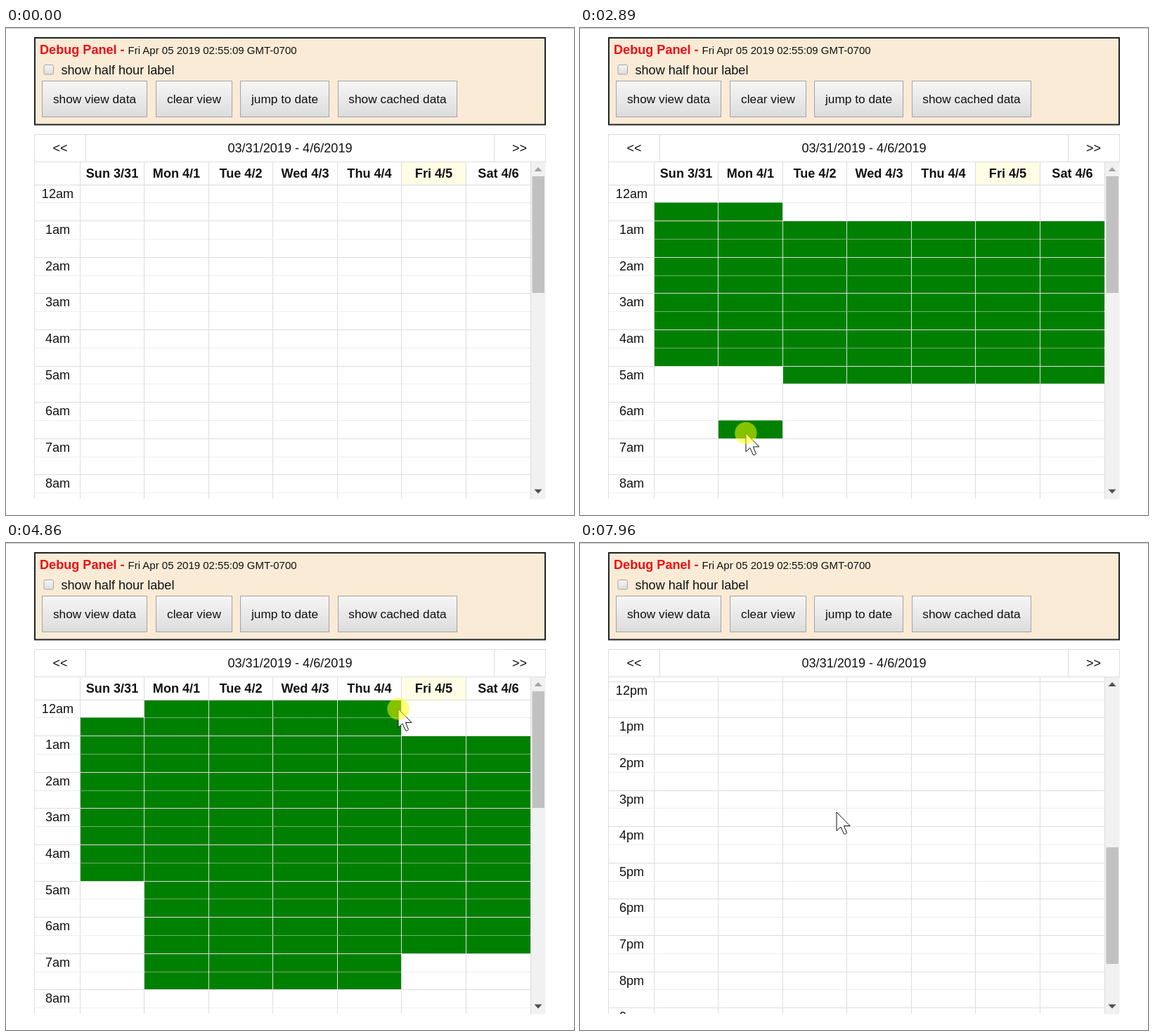
An HTML page for the animation above (8000 ms loop, 808 by 693 pixels).

```html
<!DOCTYPE html>
<html>
<head>
<meta charset="utf-8">
<title>Schedule</title>
<style>
html, body { margin: 0; width: 100%; height: 100%; overflow: hidden; background: #fff; }
svg { display: block; font-family: "Liberation Sans", Arial, sans-serif; font-size: 18.1px; fill: #111; }
</style>
</head>
<body>
<svg id="stage" width="808" height="693" viewBox="0 0 808 693">
  <defs>
    <linearGradient id="face" x2="0" y2="1">
      <stop stop-color="#f6f6f6"/><stop offset="1" stop-color="#dcdcdc"/>
    </linearGradient>
    <clipPath id="view"><rect x="40" y="190" width="707" height="480"/></clipPath>
  </defs>
</svg>
<script>
const LOOP = 8000, TICK = 77, LAG = 75, HOLD = 90;
const DAYS = 7, SLOTS = 16, ROW = 25.8, TOP = 223, SCROLL = 645;
const GREY = '#ddd';
const colX = c => Math.round(104.7 + 91.55 * c);
const rowY = r => Math.floor(TOP + ROW * r + .001);
const clamp = (v, a, b) => Math.min(b, Math.max(a, v));
const stage = document.getElementById('stage');

function add(parent, tag, attrs, text) {
  const el = document.createElementNS('http://www.w3.org/2000/svg', tag);
  for (const k in attrs) el.setAttribute(k, attrs[k]);
  if (text) el.textContent = text;
  parent.appendChild(el);
  return el;
}
const box = (p, x, y, width, height, fill, more) =>
  add(p, 'rect', { x, y, width, height, fill, ...more });
const label = (p, x, y, text, more) => add(p, 'text', { x, y, ...more }, text);
const mid = { 'text-anchor': 'middle' };
const bold = { 'font-weight': 'bold' };

// Debug panel
box(stage, 0, 0, 808, 1, '#c8c8c8');
box(stage, 41, 14, 726, 123.5, '#faebd7', { stroke: '#222', 'stroke-width': 2 });
label(stage, 48, 37, 'Debug Panel -', { ...bold, fill: '#f00e12' });
label(stage, 173.5, 37, 'Fri Apr 05 2019 02:55:09 GMT-0700', { 'font-size': 15 });
box(stage, 54, 52.5, 13.5, 13.5, 'url(#face)', { rx: 2, stroke: '#a5a5a5' });
label(stage, 78.5, 66, 'show half hour label');
[[51, 149, 'show view data'], [213, 108, 'clear view'],
 [333, 126, 'jump to date'], [472, 169, 'show cached data']].forEach(([x, w, text]) => {
  box(stage, x + .5, 75.5, w, 51, 'url(#face)', { stroke: '#a3a3a3' });
  label(stage, x + .5 + w / 2, 107, text, { ...mid, 'font-size': 17.3 });
});

// Scrolling calendar
const page = add(add(stage, 'g', { 'clip-path': 'url(#view)' }), 'g', {});
box(page, colX(5), 190, 92, 33, '#fffde5');
['Sun 3/31', 'Mon 4/1', 'Tue 4/2', 'Wed 4/3', 'Thu 4/4', 'Fri 4/5', 'Sat 4/6'].forEach((day, c) =>
  label(page, (colX(c) + colX(c + 1)) / 2 + .5, 212.5, day, { ...mid, ...bold }));

const cells = [];
for (let c = 0; c < DAYS; c++) {
  for (let r = 0; r < SLOTS; r++) {
    const x = colX(c), y = rowY(r);
    cells.push(box(page, x, y, colX(c + 1) - x, rowY(r + 1) - y, '#008000'));
  }
}
for (let r = 0; r <= 48; r++) {
  const y = rowY(r), h = r / 2;
  if (r % 2) {
    add(page, 'path', { d: `M41 ${y + .5}H746`, stroke: GREY, 'stroke-dasharray': '1 1' });
  } else {
    box(page, 41, y, 705, 1, GREY);
    if (r < 48) label(page, 73.5, y + 19, (h % 12 || 12) + (h < 12 ? 'am' : 'pm'), mid);
  }
}
for (let c = 0; c <= DAYS; c++) box(page, colX(c), 190, 1, 1275, GREY);
box(stage, 40, 151, 1, 519, GREY);

// Navigation bar
box(stage, 40.5, 151.5, 727, 39, '#fff', { stroke: GREY });
box(stage, 113, 151, 1, 39, GREY);
box(stage, 694, 151, 1, 39, GREY);
label(stage, 77, 177, '<<', mid);
label(stage, 404, 177, '03/31/2019 - 4/6/2019', mid);
label(stage, 730.5, 177, '>>', mid);

// Scrollbar
box(stage, 747, 191, 20.5, 479.5, '#f1f1f1');
const thumb = box(stage, 748.5, 211, 17.5, 166, '#c1c1c1');
const up = add(stage, 'path', { d: 'M751.5 204l5.5-6 5.5 6z' });
add(stage, 'path', { d: 'M751.5 656.5l5.5 6 5.5-6z', fill: '#505050' });

// Pointer
const pointer = add(stage, 'g', {});
add(pointer, 'path', {
  d: 'M0 0V26.5L6 21L10.5 31Q13 32 14.5 29.5L10.5 19.5H19Z',
  fill: '#fff', stroke: '#111'
});
const halo = add(pointer, 'circle', { r: 15.7, fill: '#ff0' });

// Each drag fills or clears the block of cells between two points
const drag = (press, arrive, from, to, fill) => ({ press, arrive, from, to, fill });
const drags = [
  drag(70, 530, [150, 266], [250, 470], true),
  drag(1000, 1540, [300, 293], [503, 481.5], true),
  drag(2010, 2310, [600, 281], [725, 489], true),
  drag(2880, 3580, [235, 577], [705, 281], true),
  drag(4220, 4780, [255, 628], [558, 236], true),
  drag(5410, 5640, [240, 340], [245, 420], false),
  drag(5860, 6160, [496, 424], [600, 520], false),
  drag(6390, 6540, [240, 545], [330, 595], false),
  drag(6640, 6730, [510, 295], [514, 312], false)
];

// Turning points of the free pointer: time, place
const turns = [
  [830, [270, 293]], [2580, [332, 472]], [2740, [240, 615]], [4140, [255, 626]],
  [5190, [558, 236]], [7030, [510, 443]], [7270, [508, 443]],
  [7580, [470, 471]], [7800, [288, 350]], [7960, [365, 383]]
];
const route = turns.concat(...drags.map(d =>
  [[d.press, d.from], [d.arrive, d.to], [d.arrive + HOLD, d.to]])).sort((a, b) => a[0] - b[0]);

// The picture advances in ticks during these spans and rests between them
const spans = [
  [70, 830], [1000, 1780], [1860, 2580], [2670, 3430], [3500, 4300],
  [4380, 4860], [5190, 5940], [6010, 6810], [6880, 7270], [7500, 7960]
];

function snap(t) {
  const span = spans.filter(s => s[0] <= t).pop();
  if (!span) return 0;
  const [a, b] = span, n = Math.round((b - a) / TICK);
  const step = (b - a) / n;
  return a + step * Math.min(n, Math.floor((t - a) / step + .12));
}

function pos(t) {
  const i = clamp(route.findIndex(p => p[0] >= t), 1, route.length - 1);
  const [t0, p] = route[i - 1], [t1, q] = route[i];
  const k = clamp((t - t0) / (t1 - t0), 0, 1), ease = k * k * (3 - 2 * k);
  return p.map((v, j) => v + (q[j] - v) * ease);
}

function cellAt(t) {
  const [x, y] = pos(t);
  let c = 0;
  while (c < DAYS - 1 && x >= colX(c + 1)) c++;
  return [c, clamp(Math.floor((y - TOP) / ROW), 0, SLOTS - 1)];
}

const between = (v, a, b) => v >= Math.min(a, b) && v <= Math.max(a, b);

function render(time) {
  const t = snap(time);
  const begun = drags.filter(d => d.press <= t);
  const blocks = begun.map(d =>
    [cellAt(d.press), cellAt(clamp(t - LAG, d.press, d.arrive)), d.fill]);
  cells.forEach((el, i) => {
    const c = Math.floor(i / SLOTS), r = i % SLOTS;
    const last = blocks.filter(([a, b]) => between(c, a[0], b[0]) && between(r, a[1], b[1])).pop();
    el.setAttribute('visibility', last && last[2] ? 'visible' : 'hidden');
  });

  const scroll = Math.round(SCROLL * clamp((t - 7114) / 156, 0, 1));
  page.setAttribute('transform', `translate(0 ${-scroll})`);
  thumb.setAttribute('y', 211 + scroll * 222 / SCROLL);
  up.setAttribute('fill', scroll ? '#505050' : '#a3a3a3');

  pointer.setAttribute('transform', `translate(${pos(t)})`);
  pointer.setAttribute('visibility', begun.length ? 'visible' : 'hidden');
  halo.setAttribute('opacity', begun.some(d => t < d.arrive + HOLD) ? .52 : 0);
}

const start = performance.now();
function tick() {
  render((performance.now() - start) % LOOP);
  requestAnimationFrame(tick);
}
tick();
</script>
</body>
</html>
```
